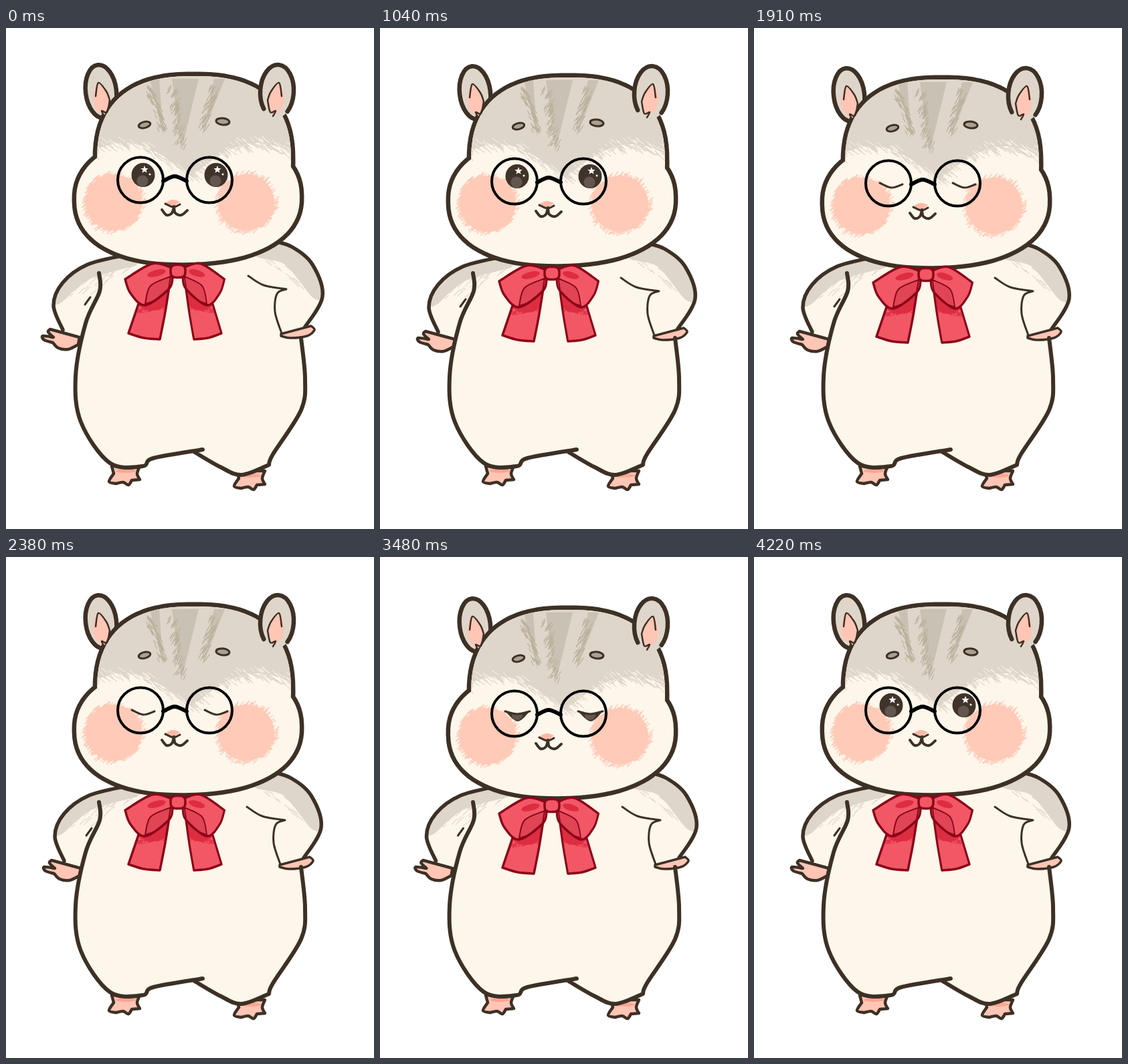
These frames come from a looping animation (550 px wide and 750 px high, 4290 ms). An HTML page with a canvas:

```html
<!DOCTYPE html>
<html lang="en">
<head>
<meta charset="utf-8">
<title>Dancing hamster</title>
<style>
html, body { margin: 0; width: 100%; height: 100%; overflow: hidden; background: #fff; }
canvas { display: block; }
</style>
</head>
<body>
<canvas id="stage" width="550" height="750"></canvas>
<script>
const ctx = document.getElementById('stage').getContext('2d');
const INK = '#3d3025', CREAM = '#fdf6ea', GREY = '#ded6cb', STRIPE = '#c9c1b4', STRAW = '#bcb19b',
  PINK = '#ffc5b5', CHEEK = '#ffcab7', EYE = '#40332a', SHINE = '#625650',
  RED = '#f25766', DEEP = '#dd2d40', WINE = '#8a0618';

let seed = 7;
const random = () => (seed = seed * 16807 % 2147483647) / 2147483647;
const around = (middle, spread) => middle + (random() - .5) * spread;
const parse = text => text.trim().split(/\s+/).map(pair => pair.split(',').map(Number));

// Smooth path through "x,y" points; "|" marks a corner.
function curve(text, closed) {
  const path = new Path2D();
  let last;
  for (const part of text.split('|')) {
    const p = parse(part);
    if (last) p.unshift(last); else path.moveTo(...p[0]);
    for (let i = 0; i < p.length - 1; i++) {
      const a = p[i - 1] || p[i], b = p[i], c = p[i + 1], d = p[i + 2] || c;
      path.bezierCurveTo(b[0] + (c[0] - a[0]) / 6, b[1] + (c[1] - a[1]) / 6,
        c[0] - (d[0] - b[0]) / 6, c[1] - (d[1] - b[1]) / 6, ...c);
    }
    last = p[p.length - 1];
  }
  if (closed) path.closePath();
  return path;
}

// Path through place(t), t from 0 to 1.
function trace(place, steps = 90) {
  const path = new Path2D();
  for (let i = 0; i <= steps; i++) path.lineTo(...place(i / steps));
  return path;
}

// Tilted superellipse; a power above 2 makes it boxier.
const blob = (x, y, rx, ry, power, tilt = 0) => trace(t => {
  const bend = v => Math.sign(v) * Math.abs(v) ** (2 / power);
  const dx = rx * bend(Math.cos(t * 2 * Math.PI)), dy = ry * bend(Math.sin(t * 2 * Math.PI));
  return [x + dx * Math.cos(tilt) - dy * Math.sin(tilt), y + dx * Math.sin(tilt) + dy * Math.cos(tilt)];
});

function oval(x, y, rx, ry = rx, turn = 0, from = 0, to = 2 * Math.PI) {
  const path = new Path2D();
  path.ellipse(x, y, rx, ry, turn, from, to);
  return path;
}

// Short pencil strokes scattered around place(t).
function hatch(place, count, length, angle, spread) {
  const path = new Path2D();
  for (let i = 0; i < count; i++) {
    const [x, y] = place(random()).map(v => around(v, spread));
    const half = length * (.3 + random() * .7) / 2, turn = around(angle, .3);
    const dx = Math.cos(turn) * half, dy = Math.sin(turn) * half;
    path.moveTo(x - dx, y - dy);
    path.lineTo(x + dx, y + dy);
  }
  return path;
}

const between = (x1, y1, x2, y2) => t => [x1 + (x2 - x1) * t, y1 + (y2 - y1) * t];
const ring = (x, y, r) => t => [x + r * Math.cos(t * 2 * Math.PI), y + r * Math.sin(t * 2 * Math.PI)];

function fill(path, color) { ctx.fillStyle = color; ctx.fill(path); }
function line(path, width, color = INK) {
  ctx.strokeStyle = color;
  ctx.lineWidth = width;
  ctx.stroke(path);
}
function shape(path, color, width, ink) { fill(path, color); line(path, width, ink); }
function group(x, y, draw, clip) {
  ctx.save();
  ctx.translate(x, y);
  if (clip) ctx.clip(clip);
  draw();
  ctx.restore();
}
// Draws again, flipped about the vertical line at x.
function mirrored(x, draw, scale = 1) {
  ctx.save();
  ctx.translate(x, 0);
  ctx.scale(-scale, 1);
  ctx.translate(-x, 0);
  draw();
  ctx.restore();
}

// Body and limbs
const leftSide = '139,367 140,394 119,442 104,522 112,590 155,651 204,656 220,644 294,631';
const rightSide = '282,635 320,657 352,669 393,654 | 399,638 441,572 447,525 441,464';
const bodyFill = curve(`${leftSide} | ${rightSide} | 400,330 150,345`, true);
const bodyLines = [curve(leftSide), curve(rightSide)];
const foot = curve('-20,-12 -17,-1 | -24,11 -13,14 | -3,12 5,16 10,9 | 22,8 | 18,-1 22,-12', true);

function makeArm(outline, inner, hand, creases, fur) {
  return {
    outline: curve(outline), fill: curve(`${outline} | ${inner}`, true), hand: curve(hand, true),
    creases: creases.map(c => curve(c)), fur: curve(fur.path),
    fringe: hatch(between(...fur.ends), 110, 20, fur.angle, 46)
  };
}
const leftArm = makeArm('178,340 122,354 85,381 71,415 85,452', '132,460 146,400 | 200,350',
  '110,463 66,451 | 63,455 71,463 | 55,461 57,467 70,471 | 78,479 93,481 108,474', ['126,403 118,414'],
  { path: '70,392 115,355 195,332', ends: [75, 388, 185, 338], angle: -.75 });
const rightArm = makeArm('400,319 428,328 458,354 473,402 446,449', '411,457 401,425 412,391 | 362,371 | 370,335',
  '411,458 456,446 | 461,452 450,461 425,464 411,461', ['362,371 385,385 419,391 | 405,398 402,425 412,457'],
  { path: '385,322 430,335 472,385', ends: [392, 322, 472, 378], angle: .75 });

// Head
const head = new Path2D(blob(281, 200, 145, 128, 2.5));
head.addPath(blob(272, 255, 167, 96, 2.3, -.025));
const capEdge = t => {
  const x = 125 + 310 * t;
  return [x, 222 - 50 * Math.sin(Math.abs(x - 276) / 100 * Math.PI / 2)];
};
const cap = trace(capEdge);
cap.lineTo(435, 60);
cap.lineTo(125, 60);
const capFringe = hatch(capEdge, 170, 22, .7, 14);
const capLight = hatch(capEdge, 70, 16, .7, 16);
const stripes = [[222, 7, 235, 162], [268, 20, 262, 184], [319, 8, 293, 162]].map(([x, half, tipX, tipY]) => ({
  wedge: curve(`${x - half},76 | ${x + half},76 | ${tipX},${tipY}`, true),
  strokes: hatch(between(x - half, 90, tipX, tipY - 10), 60, 14, tipX > x ? 1 : 2.1, 12)
}));
const cheeks = [161, 359].map(x => ({
  disc: oval(x, 261, 42), fuzz: hatch(ring(x, 261, 42), 170, 12, -.75, 7)
}));
const innerEar = curve('136,81 130,103 134,120 147,131 | 155,108 150,92 136,81', true);
const innerEarLine = curve('134,102 138,82 150,95 155,108 | 151,126 143,124 147,132');
const nose = curve('239,261 249,257 260,260 | 250,268', true);
const noseLine = curve('238,263 250,268 260,264');
const mouth = curve('233,272 240,280 248,277 251,267 | 253,277 262,280 271,273');
const bridge = curve('235,229 252,222 270,229');
const lid = curve('188,227 205,234 222,229');
const halfEye = curve('187,224 205,227 224,224 | 206,239 187,224', true);
const star = trace(t => ring(207, 212, Math.round(t * 10) % 2 ? 2.6 : 6)(t - .25), 10);

// Left half of the bow; the right half is its mirror image
const bow = {
  tail: curve('199,410 183,457 | 206,464 230,466 | 238,425 246,374', true),
  shade: oval(222, 404, 26, 18, -.3),
  fringe: hatch(between(196, 424, 240, 417), 40, 8, -.3, 6),
  loop: curve('246,358 218,353 178,376 | 186,397 208,415 243,391 249,374', true),
  fold: curve('246,372 216,386 208,413 | 228,405 243,391', true),
  dimple: oval(225, 367, 14, 5, -.25)
};
const knot = blob(257, 364, 11, 9.5, 3);

function drawArm(arm) {
  fill(arm.fill, CREAM);
  group(0, 0, () => { line(arm.fur, 46, GREY); line(arm.fringe, 1.1, GREY); }, arm.fill);
  line(arm.outline, 5.5);
  arm.creases.forEach(c => line(c, 3));
}

function drawFoot() {
  shape(foot, PINK, 4.5);
  fill(oval(1, -5, 15, 3), '#ffa592');
}

function drawEye(state) {
  if (state === 'closed') return line(lid, 3);
  if (state === 'half') {
    fill(halfEye, EYE);
    group(0, 0, () => fill(oval(205, 230, 8, 7), SHINE), halfEye);
    return line(curve('187,224 205,228 224,224'), 3);
  }
  fill(oval(205, 220, 17.5, 18), EYE);
  fill(oval(204, 229, 8.5), SHINE);
  fill(star, '#fff');
  fill(oval(215, 219, 1.5), '#fff');
}

function drawInnerEar() { fill(innerEar, PINK); line(innerEarLine, 2.5); }

function drawHead(eyes) {
  shape(oval(142, 95, 23, 40, -.12), GREY, 6.5);
  line(head, 13);
  fill(head, CREAM);
  group(0, 0, () => {
    fill(cap, GREY);
    line(capFringe, 1.2, GREY);
    line(capLight, 1, CREAM);
    for (const s of stripes) { fill(s.wedge, STRIPE); line(s.strokes, 1.2, STRAW); }
    for (const c of cheeks) { fill(c.disc, CHEEK); line(c.fuzz, 1.3, CHEEK); }
  }, head);
  fill(oval(405, 95, 25, 40, .05), GREY);
  line(oval(405, 95, 25, 40, .05, 2.4, 7.1), 6.5);
  drawInnerEar();
  mirrored(273, drawInnerEar);
  shape(oval(207, 145, 9, 4.5, -.25), '#aaa090', 3);
  shape(oval(324, 140, 10, 5, .1), '#aaa090', 3);
  for (const x of [0, 109]) group(x, 0, () => drawEye(eyes));
  for (const x of [201, 304]) line(oval(x, 227.5, 34), 4, '#000');
  line(bridge, 6, '#000');
  fill(nose, '#ffb9a5');
  line(noseLine, 3);
  line(mouth, 4);
}

function drawBowHalf() {
  fill(bow.tail, RED);
  group(0, 0, () => { fill(bow.shade, DEEP); line(bow.fringe, 1, DEEP); }, bow.tail);
  line(bow.tail, 3.5, WINE);
  fill(bow.loop, RED);
  fill(bow.dimple, DEEP);
  shape(bow.fold, '#e04455', 2, WINE);
  line(bow.loop, 3.5, WINE);
}

function drawBow() {
  drawBowHalf();
  mirrored(257, drawBowHalf, .88);
  shape(knot, RED, 3.5, WINE);
}

// Each bob sinks through levels 0 to 3 and rises again; beats are in ms.
const levels = [0, 1, 2, 3, 2, 1];
const firstBob = [230, 170, 170, 300, 170, 170], slowBob = [530, 170, 230, 70, 170, 170];
const beats = [...firstBob, ...slowBob, ...slowBob];
const loopTime = beats.reduce((sum, ms) => sum + ms);

function levelAt(time) {
  let i = 0;
  while (time >= beats[i]) time -= beats[i++];
  return levels[i % 6];
}

function eyesAt(time, level) {
  const within = (from, to) => time >= from && time < to;
  if (time < 1540 || within(2880, 2950) || time >= 4220) return 'open';
  return time < 1610 || within(2950, 3080) || level === 3 ? 'half' : 'closed';
}

function frame() {
  const time = performance.now() % loopTime, level = levelAt(time);
  const middle = level === 1 || level === 2;
  const armY = Math.min(level, 1) * 3;
  ctx.clearRect(0, 0, 550, 750);
  ctx.lineCap = ctx.lineJoin = 'round';
  group(178, 668, drawFoot);
  group(365, 675, drawFoot);
  group(middle ? 2 : -level / 2, armY, () => shape(leftArm.hand, PINK, 4.5));
  fill(bodyFill, CREAM);
  group(middle ? 2 : -level / 2, armY, () => drawArm(leftArm));
  group(middle ? -2 : 0, armY, () => {
    drawArm(rightArm);
    shape(rightArm.hand, PINK, 3.5);
  });
  bodyLines.forEach(l => line(l, 6));
  group(0, Math.round(level * 2.4), () => drawHead(eyes = eyesAt(time, level)));
  group(0, Math.round(level * 2.6), drawBow);
  requestAnimationFrame(frame);
}
let eyes;
frame();
</script>
</body>
</html>
```
